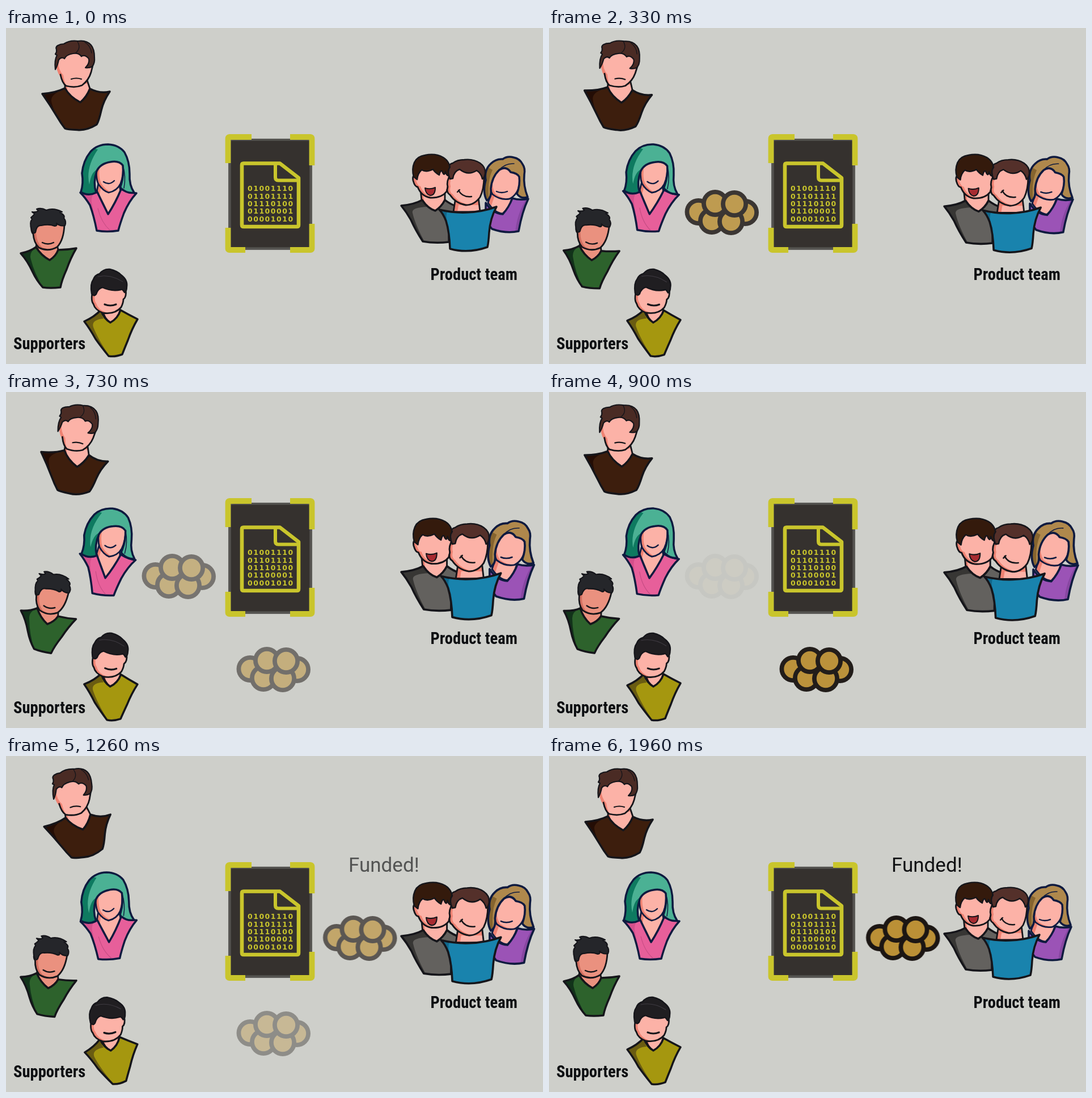
Recreate the animation shown at these times as an HTML page with a canvas. Size 947 by 592 pixels, loop 2 s.

```html
<!DOCTYPE html>
<html lang="en">
<head>
<meta charset="utf-8">
<title>Crowdfunding contract</title>
<style>
html, body { margin: 0; width: 100%; height: 100%; overflow: hidden; background: #cecfca; }
canvas { display: block; width: 947px; height: 592px; }
</style>
</head>
<body>
<canvas id="stage" width="947" height="592"></canvas>
<script>
const ctx = document.getElementById('stage').getContext('2d');
const LOOP = 2000;
const INK = '#15151a', NAVY = '#0e1a3f', LIME = '#c9c52c';
const SKIN = '#fcb2a7', BLUSH = '#ee8272';

const ease = p => (1 - Math.cos(Math.PI * Math.min(1, Math.max(0, p)))) / 2;
const ramp = (t, a, b) => Math.min(1, Math.max(0, (t - a) / (b - a)));

// Rest, lean right, lean left, rest.
function sway(t, up, down) {
  if (t < 640) return up * ease(t / 640);
  if (t < 1333) return up - (up + down) * ease((t - 640) / 693);
  return -down * (1 - ease((t - 1333) / 667));
}
const nod = t => t < 740 ? ease(t / 740) : 1 - ease((t - 740) / 1260);

const paths = {};
const path = d => paths[d] || (paths[d] = new Path2D(d));

function fill(d, color) {
  ctx.fillStyle = color;
  ctx.fill(path(d));
}
function line(d, width = 2.8, color = INK) {
  ctx.strokeStyle = color;
  ctx.lineWidth = width;
  ctx.stroke(path(d));
}
function shape(d, color, width = 3, ink = INK) {
  fill(d, color);
  line(d, width, ink);
}
// Skin with a shaded edge on the left.
function skin(d, ink = INK, light = SKIN, dark = BLUSH, dx = 5, dy = -1) {
  ctx.save();
  ctx.clip(path(d));
  fill(d, dark);
  ctx.translate(dx, dy);
  fill(d, light);
  ctx.restore();
  line(d, 2.8, ink);
}
// Flat colour with a darker fold that stays inside its outline.
function cloth(d, color, fold, dark, ink = INK) {
  fill(d, color);
  ctx.save();
  ctx.clip(path(d));
  fill(fold, dark);
  ctx.restore();
  line(d, 3.5, ink);
}
function turn(deg, x, y, draw) {
  ctx.save();
  ctx.translate(x, y);
  ctx.rotate(deg * Math.PI / 180);
  ctx.translate(-x, -y);
  draw();
  ctx.restore();
}

function brownMan(t) {
  turn(sway(t, 10.8, 9), 123, 99, () => {
    skin('M104 92 L104 107 Q112 122 131 131 Q142 122 148 107 L143 92 Z', INK, SKIN, BLUSH, 4, 6);
    cloth('M64 116 Q88 114 104 106 Q112 121 131 131 Q142 122 148 107 Q165 116 183 112 Q172 128 168 145 Q164 163 160 170 Q142 181 126 179.5 Q108 179 104 177 Q97 168 90 156 Q78 136 64 116 Z',
      '#3d1e0d', 'M60 116 L102 108 Q78 117 80 129 Q84 150 104 180 L80 160 Z', '#240d05');
  });
  turn(sway(t, 6.8, 4.8), 123, 112, () => {
    fill('M89 55 Q87 74 96 86 Q99 98 106 102 Q122 107 134 101 Q146 92 150 78 Q154 72 153 48 L120 38 L92 48 Z', SKIN);
    fill('M89 58 Q87 74 96 86 Q99 98 106 102 Q102 92 101 83 Q92 74 92 58 Z', BLUSH);
    line('M96 82 Q99 97 106 102 Q122 106 134 101 Q146 92 150 78 L153 66');
    line('M115 90 Q124 87 133 90', 2.2);
    shape('M87 73 Q85 56 90 48 L87 46 Q90 42 89 38 Q87 34 91 31 Q96 28 102 28 Q112 21 127 23 Q142 21 150 30 Q156 37 156 52 Q157 62 152 68 Q147 71 140 70 Q148 62 146 54 Q139 46 133 50 Q128 43 118 45 Q106 47 103 54 Q98 50 93 56 Q91 66 87 73 Z', '#4a2b24', 2.2);
    line('M126 24 Q133 35 123 44 M139 25 Q149 31 151 44', 1.3);
  });
}

function tealWoman(t) {
  turn(sway(t, 6.2, 2.2), 180, 280, () => {
    skin('M164 268 L160 289 Q171 308 180 328 Q193 308 202 287 L198 268 Z', NAVY, SKIN, BLUSH, 4, 10);
    cloth('M131 290 Q145 292 160 287 Q170 308 180 328 Q193 308 203 284 Q217 291 230 291 Q217 305 208 326 Q201 345 198 357 Q178 360 160 357 Q155 331 148 312 Q140 299 131 290 Z',
      '#e75f9a', 'M128 288 L158 289 Q148 296 152 312 L161 359 L145 340 Z', '#d44f8b', NAVY);
    line('M162 318 Q168 343 183 356', 1, '#c14a80');
  });
  turn(sway(t, 5, 1.8), 180, 300, () => {
    skin('M161 238 Q157 262 163 275 Q171 287 181 290 Q196 287 202 274 Q208 260 206 236 Q184 228 161 238 Z', NAVY);
    line('M172 271 Q182 278 191 269', 2.4, NAVY);
    cloth('M132 289 Q137 274 134 256 Q136 234 149 218 Q161 205 180 205 Q199 206 209 219 Q218 235 218 257 Q217 277 226 290 Q214 292 205 284 Q200 282 203 276 Q208 260 206 242 Q199 233 184 236 Q166 239 160 252 Q153 273 159 290 Q145 297 132 289 Z',
      '#4bb194', 'M153 212 Q124 244 128 294 L159 293 Q151 272 160 250 Q150 254 147 276 Q140 246 162 214 Z', '#0e7a60', NAVY);
    line('M206 242 Q212 262 208 282', 1.5, NAVY);
  });
}

function greenMan(t) {
  const n = nod(t), light = '#ea917f', dark = '#d36f60';
  turn(14 * n, 75, 392, () => {
    skin('M54 376 L53 387 Q62 402 77 409 Q88 402 92 391 L89 376 Z', INK, light, dark, 4, 6);
    cloth('M26 397 Q42 394 53 386 Q62 401 77 409 Q88 402 92 391 Q108 391 124 388 Q114 405 107 425 Q98 445 96 457 Q78 459 65 457 Q54 445 47 430 Q38 410 26 397 Z',
      '#2d622c', 'M22 396 L52 387 Q40 396 44 408 Q50 432 66 459 L45 440 Z', '#12331a');
  });
  turn(10.2 * n, 74, 392, () => {
    skin('M46 348 Q43 358 48 363 Q49 378 58 387 Q74 395 90 386 Q102 374 103 346 L96 332 L55 336 Z', INK, light, dark);
    line('M64 378 Q74 383 84 378', 2.4);
    shape('M45 356 Q41 342 46 337 L44 334 Q50 329 50 327 L46 324 Q54 325 57 322 L54 319 Q62 316 71 321 Q84 316 99 324 L95 325 Q105 330 102 335 Q107 341 104 348 Q95 350 89 344 Q91 349 86 349 Q76 345 62 348 Q54 347 52 360 Q48 364 45 356 Z', '#25262a', 2.2);
  });
}

function yellowMan(t) {
  turn(sway(t, 3, 6.6), 185, 512, () => {
    skin('M172 488 L171 500 Q174 512 184 519 Q198 512 201 498 L200 485 Z', INK, SKIN, BLUSH, 4, 9);
    cloth('M138 517 Q156 509 167 497 Q173 513 184 519 Q197 512 202 497 Q216 505 232 513 Q222 530 215 550 Q208 567 205 575 Q192 580 181 578 Q168 562 158 548 Q148 530 138 517 Z',
      '#a5970f', 'M134 516 L166 499 L172 512 Q150 514 154 527 Q162 548 183 579 L158 562 Z', '#6a5c12');
  });
  turn(sway(t, 2.6, 3.6), 184, 504, () => {
    skin('M153 462 Q149 480 154 486 Q157 497 171 502 Q192 505 203 492 Q207 484 207 478 Q213 474 211 460 L204 446 L165 448 Z');
    line('M174 487 Q184 491 194 487', 3.2);
    shape('M151 468 Q148 451 154 443 Q157 435 165 433 Q172 424 183 425 Q196 428 203 435 Q215 444 213 456 Q213 464 209 466 Q205 459 203 461 Q187 465 170 457 Q162 459 159 469 Q155 474 151 468 Z', '#201e21', 2.4);
    line('M162 438 Q184 433 206 447', 1, '#3f3b42');
  });
}

function team(t) {
  const k = 1 + .055 * (1 - Math.cos(2 * Math.PI * t / LOOP)) / 2;
  ctx.save();
  ctx.translate(696, 222);
  ctx.scale(k, k);
  ctx.translate(-696, -222);

  // woman at the back
  skin('M858 285 L850 308 Q862 326 876 327 Q888 316 892 300 L892 288 Z', NAVY, SKIN, BLUSH, 4, 10);
  cloth('M846 308 Q858 327 876 328 Q887 316 893 300 Q906 304 921 301 Q910 324 904 358 Q882 363 857 354 L846 340 Z',
    '#9b53b6', 'M917 302 Q900 330 898 362 L925 360 Z', '#8747a1', NAVY);
  skin('M853 252 Q850 280 858 293 Q872 304 888 301 Q902 294 906 275 Q908 258 902 246 L870 240 Z', NAVY);
  line('M865 288 Q874 292 884 288', 2.4, NAVY);
  cloth('M846 268 Q843 250 855 239 Q864 230 876 231 Q884 225 895 228 Q906 230 911 240 Q916 247 914 258 Q912 278 920 298 Q908 302 901 292 Q907 276 905 262 Q902 256 890 254 Q882 242 870 250 Q857 262 855 283 Q857 299 848 304 Q840 290 846 268 Z',
    '#af884c', 'M840 240 L858 250 Q848 270 852 306 L834 304 Z', '#86642f', NAVY);
  line('M870 250 Q880 238 896 239', 1.5, NAVY);

  // laughing man
  skin('M731 285 L733 304 Q744 318 757 322 Q768 315 774 303 L774 285 Z', INK, SKIN, BLUSH, 5, 9);
  cloth('M697 313 Q720 311 734 303 Q744 318 757 322 Q768 315 774 303 Q784 311 797 315 Q780 342 781 377 Q757 380 735 376 Q722 356 714 338 Q706 324 697 313 Z',
    '#63615e', 'M692 312 L734 304 L744 315 Q714 316 717 326 Q722 348 740 380 L705 350 Z', '#373634');
  skin('M723 250 L722 260 Q716 259 718 269 Q721 280 726 280 Q732 296 748 299 Q768 300 777 288 Q783 270 781 246 L770 236 L730 240 Z');
  shape('M739 282 Q748 285 757 281 Q757 295 748 295 Q740 293 739 282 Z', '#a72b31', 2);
  shape('M719 262 Q715 249 720 237 Q725 226 739 224 Q757 220 771 228 Q784 236 783 252 Q783 262 779 260 Q776 258 775 253 Q773 263 769 252 Q766 250 764 259 Q757 255 753 249 Q741 255 733 250 Q726 256 725 267 Z', '#341a0c', 2.4);

  // man in front
  skin('M793 298 L789 324 L836 324 L833 298 Z', INK, SKIN, BLUSH, 5, 14);
  cloth('M764 320 Q789 326 812 325 Q840 324 865 315 Q854 335 852 360 Q851 378 849 386 Q815 398 783 389 Q782 360 776 340 Q771 327 764 320 Z',
    '#1983ad', 'M760 318 L778 324 Q774 334 781 350 L785 392 L770 380 Z', '#10668a');
  skin('M784 258 Q776 270 779 280 Q776 290 783 294 Q793 309 811 312 Q826 312 836 298 Q843 284 843 262 L832 246 L796 246 Z');
  line('M798 286 Q805 299 821 297 M796 289 L800 285', 2.4);
  shape('M783 266 Q777 252 783 245 Q780 240 788 238 Q796 232 808 232 Q824 230 836 238 Q846 245 845 256 Q844 264 840 266 Q838 256 830 251 Q815 261 800 249 Q790 252 788 265 Z', '#54302a', 2.4);
  ctx.restore();
}

function contract() {
  ctx.fillStyle = '#5d5c59';
  ctx.fillRect(392, 195, 148, 196);
  ctx.save();
  ctx.shadowColor = '#35312e';
  ctx.shadowBlur = 5;
  ctx.fillStyle = '#35312e';
  ctx.fillRect(397, 199, 138, 187);
  ctx.restore();

  ctx.lineCap = 'butt';
  line('M433 192 H394 Q391.5 192 391.5 195 V238 M501 192 H537 Q539.5 192 539.5 195 V242 M391.5 352 V389 Q391.5 391 394 391 H422 M539.5 345 V389 Q539.5 391 537 391 H501', 9.8, LIME);
  line('M483 238.5 H419 Q416 238.5 416 241.5 V347 Q416 350 419 350 H513 Q516 350 516 347 V264 Z', 6.6, LIME);
  line('M475 238 V263 Q475 268.5 480 268.5 H516', 6, LIME);
  ctx.lineCap = 'round';

  ctx.fillStyle = LIME;
  ctx.font = 'bold 12.5px "DejaVu Sans", sans-serif';
  ctx.letterSpacing = '1.5px';
  ['01001110', '01101111', '01110100', '01100001', '00001010'].forEach((row, i) =>
    ctx.fillText(row, 426, 287.4 + i * 13.3));
  ctx.letterSpacing = '0px';
}

const pile = document.createElement('canvas');
pile.width = 140;
pile.height = 90;
function stackCoins() {
  const p = pile.getContext('2d');
  const disc = (x, y, r, color) => {
    p.fillStyle = color;
    p.beginPath();
    p.arc(x, y, r, 0, 2 * Math.PI);
    p.fill();
  };
  for (const [x, y] of [[28.5, 44], [111, 45], [52, 60], [86, 61], [58, 29], [92, 30]]) {
    disc(x, y, 24, '#1c1613');
    disc(x, y, 16.2, '#bb9036');
  }
}
stackCoins();

function coins(x, y, alpha) {
  if (alpha <= 0) return;
  ctx.globalAlpha = alpha;
  ctx.drawImage(pile, x, y);
  ctx.globalAlpha = 1;
}

function label(text, x, y) {
  ctx.font = 'bold 28.6px "Roboto Condensed", Roboto, sans-serif';
  ctx.fontStretch = 'condensed';
  // Tighten only when the condensed cut is missing.
  const wide = ctx.measureText(text).width > text.length * 13.4;
  ctx.letterSpacing = wide ? '-1.4px' : '0px';
  ctx.fillStyle = '#0d0f12';
  ctx.fillText(text, x, y);
  ctx.letterSpacing = '0px';
  ctx.fontStretch = 'normal';
}

function draw(now) {
  const t = now % LOOP;
  ctx.fillStyle = '#cecfca';
  ctx.fillRect(0, 0, 947, 592);
  ctx.lineJoin = 'round';
  ctx.lineCap = 'round';

  contract();
  brownMan(t);
  tealWoman(t);
  greenMan(t);
  yellowMan(t);
  team(t);

  const paid = ramp(t, 535, 915), funded = ramp(t, 1060, 1370);
  coins(235, 280, ramp(t, 0, 400) * (1 - paid));
  coins(402, 444, paid * (1 - funded));
  coins(554.5, 276, funded);

  label('Supporters', 13, 566);
  label('Product team', 748.5, 444);
  ctx.globalAlpha = funded;
  ctx.fillStyle = '#101113';
  ctx.font = '35px Roboto, sans-serif';
  ctx.fillText('Funded!', 604, 204);
  ctx.globalAlpha = 1;
}

let start;
function tick(now) {
  if (start === undefined) start = now;
  draw(now - start);
  requestAnimationFrame(tick);
}
draw(0);
requestAnimationFrame(tick);
</script>
</body>
</html>
```
